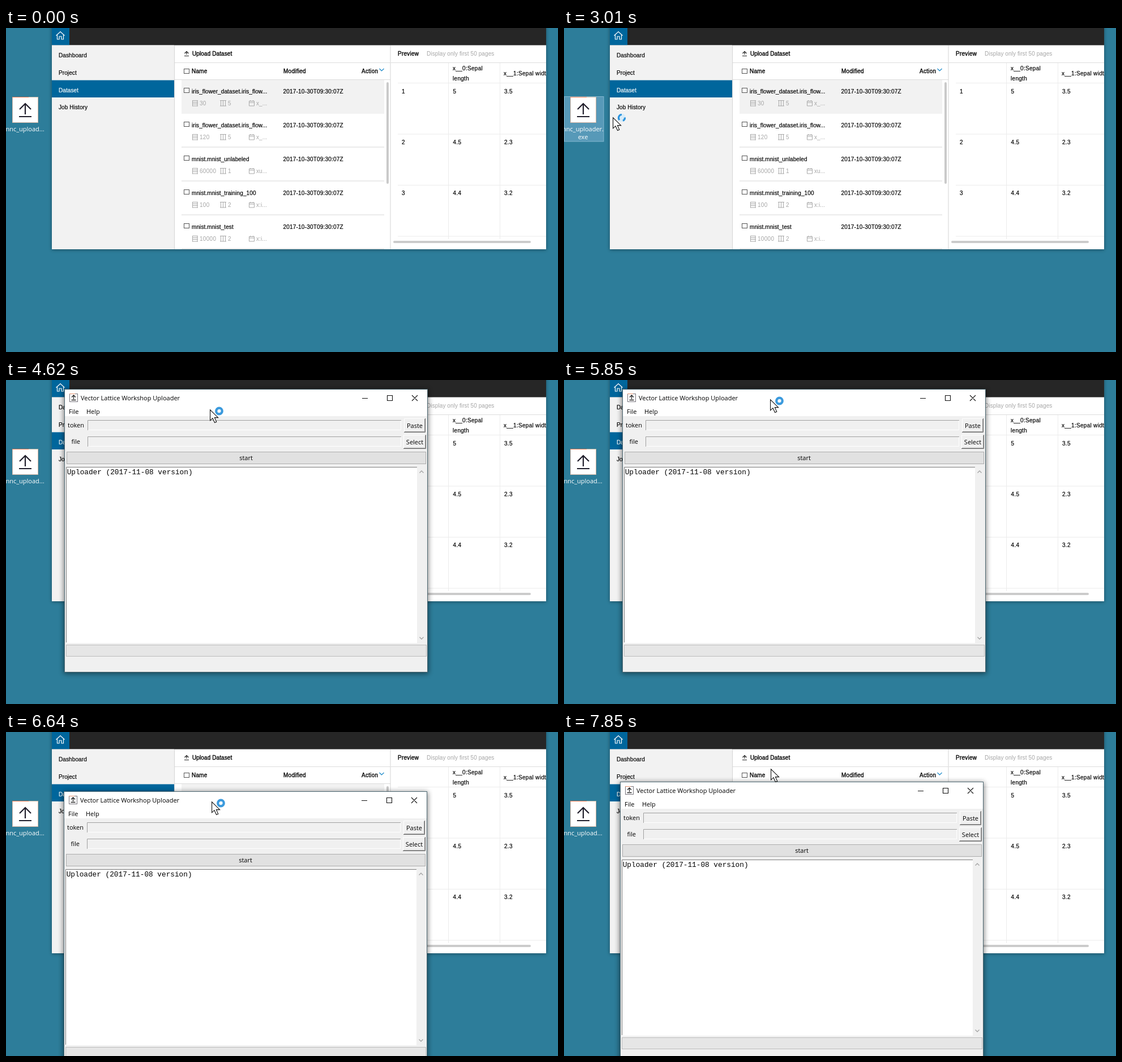
Write an HTML page that moves like this. It is 975 by 574 pixels and loops after 8 s.

```html
<!DOCTYPE html>
<html lang="en">
<head>
<meta charset="utf-8">
<title>Dataset uploader</title>
<style>
html, body { margin: 0; width: 100%; height: 100%; overflow: hidden; background: #2d7d9a; }
svg { display: block; width: 100vw; height: 100vh; }
text { white-space: pre; }
.web { font: 10px "Liberation Sans", Arial, sans-serif; letter-spacing: .1px; fill: #000; stroke: #000; stroke-width: .2px; }
.wide { letter-spacing: .3px; }
.head { letter-spacing: .25px; stroke-width: .35px; }
.pale { fill: #a6a6a6; stroke: none; }
.lit { fill: #fff; stroke: #fff; }
.ui { font: 11px "Open Sans", "Noto Sans", sans-serif; fill: #000; }
.mono { font: 12.75px "Liberation Mono", monospace; fill: #000; }
.mid { text-anchor: middle; }
.white { fill: #fff; }
</style>
</head>
<body>
<svg id="stage" viewBox="0 0 975 574" preserveAspectRatio="none">
<defs>
<filter id="soft" x="-10%" y="-10%" width="120%" height="120%"><feGaussianBlur stdDeviation="5"/></filter>
<filter id="faint" x="-10%" y="-10%" width="120%" height="120%"><feGaussianBlur stdDeviation="3"/></filter>
<clipPath id="page"><rect x="81" width="873" height="392"/></clipPath>
</defs>
</svg>
<script>
const LOOP = 8000;
const stage = document.getElementById('stage');

const rect = (x, y, w, h, fill, more = '') =>
  `<rect x="${x}" y="${y}" width="${w}" height="${h}" fill="${fill}" ${more}/>`;
const frame = (x, y, w, h, fill, stroke, more = '') =>
  rect(x + .5, y + .5, w - 1, h - 1, fill, `stroke="${stroke}" ${more}`);
const path = (d, stroke, width = 1, fill = 'none', more = '') =>
  `<path d="${d}" stroke="${stroke}" stroke-width="${width}" fill="${fill}" ${more}/>`;
const text = (x, y, str, cls, more = '') =>
  `<text x="${x}" y="${y}" class="${cls}" ${more}>${str}</text>`;
const group = (id, body) => `<g id="${id}">${body}</g>`;

function desktopIcon() {
  return group('glow', rect(.5, 121.5, 69.5, 79.5, '#4a91b9', 'id="glowBox" stroke="#74b3d8"')) +
    rect(11, 122, 46, 46, '#fff') +
    path('M11.5 122V168M56.5 122V168M11 167.5H57', '#d8b6a4') +
    path('M11 122.5H40', '#ee7a4e') + path('M40 122.5H57', '#c7b9a8') +
    path('M34 153V134M24 144L34 134L44 144M23 157H45', '#211f2c', 2.2) +
    text(33.5, 183, 'nnc_upload...', 'ui white mid', 'id="shortName"') +
    group('fullName', text(33.5, 183, 'nnc_uploader.', 'ui white mid') + text(33.5, 197, 'exe', 'ui white mid'));
}

function sidebar() {
  const items = ['Dashboard', 'Project', 'Dataset', 'Job History'];
  return rect(81, 30.5, 216, 361.5, '#f2f2f2') + rect(81, 92.5, 216, 30.5, '#00669c') +
    rect(81, 123, 216, 31, '#e2e2e2', 'id="hover"') +
    items.map((s, i) => text(93, 52 + i * 30.8, s, i === 2 ? 'web lit' : 'web')).join('');
}

function listRow([name, count, cols, field], i) {
  const y = i * 60;
  const icon = d => path(d, '#a8a8a8', 1, 'none', `transform="translate(0 ${y})"`);
  return (i ? rect(310, 150 + y, 358, 2, '#ebebeb') : rect(310, 92, 358, 60, '#f2f2f2')) +
    frame(314, 106 + y, 10, 9, '#fff', '#555') +
    text(328, 115.5 + y, name, 'web') +
    text(489.5, 115.5 + y, '2017-10-30T09:30:07Z', 'web', 'style="letter-spacing:.2px"') +
    icon('M329.5 128V138.5M338 128V138.5M329 128.5H339M329 131.5H339M329 134.5H339M329 138H339') +
    icon('M378 128.5H389M378 138H389M379.5 128V138M383.5 128V138M387.5 128V138') +
    icon('M429.5 129.5H438.5V138H429.5ZM429.5 132H438.5M431.5 128V130M436.5 128V130') +
    text(342, 137 + y, count, 'web pale wide') + text(392, 137 + y, cols, 'web pale') +
    text(442, 137 + y, field, 'web pale');
}

function datasetList() {
  const rows = [
    ['iris_flower_dataset.iris_flow...', 30, 5, 'x_...'],
    ['iris_flower_dataset.iris_flow...', 120, 5, 'x_...'],
    ['mnist.mnist_unlabeled', 60000, 1, 'xu...'],
    ['mnist.mnist_training_100', 100, 2, 'x:i...'],
    ['mnist.mnist_test', 10000, 2, 'x:i...']
  ];
  return path('M319 47V42M315.5 45L319 41.5L322.5 45M315 49.5H323', '#222', 1.2) +
    text(329, 49.3, 'Upload Dataset', 'web', 'style="stroke-width:.35px"') +
    rect(329, 50, 70, 1, '#000', 'id="underline"') +
    frame(314, 72, 10, 9, '#fff', '#555') +
    text(328, 80, 'Name', 'web head') + text(490, 80, 'Modified', 'web head') + text(628, 80, 'Action', 'web head') +
    path('M659.5 72L663.5 76L667.5 72', '#1787c8', 1.2) +
    rows.map(listRow).join('') +
    path('M298 61.5H679M298 91.5H679', '#dcdcdc') +
    rect(672, 96, 4, 180, '#cacaca', 'rx="2"') + path('M297.5 31V392M679 31V392', '#d4d4d4');
}

function preview() {
  const cells = [[1, '5', '3.5'], [2, '4.5', '2.3'], [3, '4.4', '3.2']];
  return text(692, 49, 'Preview', 'web head') + text(743, 49, 'Display only first 50 pages', 'web pale') +
    path('M680 61.5H954', '#dcdcdc') +
    path('M692 97.5H954M692 188H954M692 278.5H954M692 369H954M781.5 62V374M872.5 62V374', '#ececec') +
    text(789, 75, 'x__0:Sepal', 'web wide') + text(789, 92.5, 'length', 'web wide') +
    text(879, 84, 'x__1:Sepal width', 'web wide') +
    cells.map((row, i) => row.map((s, j) => text(699 + j * 90.5, 115.5 + i * 90.4, s, 'web wide')).join('')).join('') +
    rect(684, 377, 243, 4, '#cbcbcb', 'rx="2"');
}

function browser() {
  return rect(81, -8, 873, 401, '#000', 'opacity=".38" filter="url(#faint)"') +
    '<g clip-path="url(#page)">' + rect(81, 0, 873, 392, '#fff') + rect(81, 0, 873, 30.5, '#262626') +
    rect(81, 0, 31, 30.5, '#00669c') +
    path('M88.5 13.5L96 6.5L103.5 13.5M90.5 12.5V20H94V15H98V20H101.5V12.5', '#fff', 1.2) +
    sidebar() + datasetList() + preview() + '</g>';
}

function field(y) {
  return rect(40, y, 554, 18, '#f0f0f0') + path(`M40.5 ${y + 18}V${y + .5}H594`, '#a0a0a0') +
    path(`M41 ${y + 17.5}H593.5V${y + 1}`, '#fff');
}

function raised(x, y, w, h, label) {
  return rect(x, y, w, h, '#f0f0f0') + path(`M${x + .5} ${y + h}V${y + .5}H${x + w}`, '#fff') +
    path(`M${x + 1} ${y + h - 1.5}H${x + w - 1.5}V${y + 1}`, '#a0a0a0') +
    path(`M${x} ${y + h - .5}H${x + w - .5}V${y}`, '#696969') +
    text(x + w / 2, y + h / 2 + 4, label, 'ui mid');
}

function uploader() {
  return rect(-2, 0, 644, 503, '#000', 'opacity=".5" filter="url(#soft)"') +
    frame(-1, -1, 642, 502, '#f0f0f0', '#4f6973') + rect(0, 0, 640, 47, '#fff') +
    frame(8, 7, 15, 15, '#fff', '#77747c') + path('M8 7.5H18', '#e5936f') +
    path('M15.5 17V10.5M12 13.5L15.5 10L19 13.5M11.5 18.5H19.5', '#222', 1.3) +
    text(28, 19, 'Vector Lattice Workshop Uploader', 'ui') +
    path('M525 15.5H535M569.5 10.5H578.5V19.5H569.5ZM613 10L623 20M623 10L613 20', '#111', 1.1) +
    text(7, 43.3, 'File', 'ui') + text(38, 43.3, 'Help', 'ui') +
    text(5, 67, 'token', 'ui') + text(11.5, 96, 'file', 'ui') +
    field(54) + field(83) + raised(599, 51, 38, 25, 'Paste') + raised(598, 80, 40, 25, 'Select') +
    frame(3, 110, 635, 22, '#e1e1e1', '#adadad') + text(320, 125, 'start', 'ui mid') +
    rect(2, 137, 620, 312, '#fff') + path('M2.5 448V137.5H622', '#7b7b7b') +
    path('M626.5 147.5L630 144L633.5 147.5M626.5 438.5L630 442L633.5 438.5', '#a3a3a3', 1.3) +
    text(3.7, 150, 'Uploader (2017-11-08 version)', 'mono') +
    frame(2, 452, 637, 21, '#e6e6e6', '#bcbcbc');
}

// Every pointer has its top-left or tip at 0,0.
function pointers() {
  const arrow = path('M.6 .8V19.8L5 15.7L8.6 23.6L11.8 22.2L8.4 14.6H14.6Z', '#111', 1.1, '#fff');
  const hand = path('M5.5 18V2.5Q5.5 .6 7.3 .6T9.2 2.5V9.5Q12.3 8.3 12.8 10.7Q15.4 9.7 15.8 12Q18.5 11.4 18.5 14V19.5Q18.5 22 16.8 24V27.5H7V25L1.2 17.5Q-.2 15 1.7 14.2Q3.5 13.7 5.5 18Z', '#111', 1.1, '#fff') +
    path('M9.2 9.5V14M12.8 11V15M15.8 12.5V16', '#111');
  const resize = path('M.8 5L5.5 .7V3.8H17.5V.7L22.2 5L17.5 9.3V6.2H5.5V9.3Z', '#111', 1, '#fff');
  const ring = '<circle cx="16.5" cy="3" r="5.3" fill="#f4f8fb" stroke="#3b9add" stroke-width="4.2"/>';
  const pale = '<circle cx="16" cy="1" r="7.2" fill="#d9ecf8"/>' +
    path('M16 -4.5A5.5 5.5 0 0 0 12 4.8M18 6.2A5.5 5.5 0 0 0 21.4 .5', '#2c94de', 3.2);
  return group('arrow', arrow) + group('hand', hand) + group('resize', resize) + group('ring', ring) + group('pale', pale);
}

stage.insertAdjacentHTML('beforeend',
  browser() + desktopIcon() + group('win', uploader()) + group('cursor', pointers()));

const el = Object.fromEntries([...stage.querySelectorAll('[id]')].map(n => [n.id, n]));
const show = (id, on) => el[id].setAttribute('display', on ? 'inline' : 'none');
const move = (id, x, y) => el[id].setAttribute('transform', `translate(${x} ${y})`);
const at = (track, t) => track.findLast(step => step[0] <= t);

// time, x, y, visible shapes
const cursorTrack = [
  [0, 0, 0, ''], [590, 582, 463, 'arrow'], [770, 284, 262, 'resize'], [990, 68, 165, 'arrow'],
  [1380, 40, 157, 'arrow'], [1800, 40, 157, 'arrow pale'], [3010, 86, 158, 'arrow pale'],
  [3230, 280, 135, 'hand'], [3400, 352, 63, 'hand'], [3610, 356, 52, 'hand'],
  [4620, 360, 52, 'arrow ring'], [5430, 364, 43, 'arrow ring'], [5640, 364, 37, 'arrow ring'],
  [5850, 364, 34, 'arrow ring'], [7250, 360, 106, 'arrow'], [7850, 365, 65, 'arrow']
];
const winTrack = [
  [4620, 104, 17], [6030, 104, 64], [6250, 104, 108], [6460, 102, 112], [6640, 103, 106],
  [6860, 103, 91], [7070, 100, 88], [7670, 100, 89]
];
const shapes = ['arrow', 'hand', 'resize', 'ring', 'pale'];

function update(t) {
  const within = (a, b) => t >= a && t < b;
  const win = at(winTrack, t);
  let [, x, y, kind] = at(cursorTrack, t);

  show('win', win);
  if (win) move('win', win[1], win[2]);
  // The pointer holds the title bar while dragging.
  if (within(6030, 7250)) [x, y] = [win[1] + 260, win[2] + 17];
  move('cursor', x, y);
  const visible = kind.split(' ');
  shapes.forEach(s => show(s, visible.includes(s)));

  const open = within(1800, 4620);
  const left = t >= 3010;
  show('glow', within(990, 4620));
  el.glowBox.setAttribute('height', open ? 79.5 : 66.5);
  el.glowBox.setAttribute('fill', left ? '#5799b8' : '#4a91b9');
  el.glowBox.setAttribute('stroke', left ? '#84b8d0' : '#74b3d8');
  show('shortName', !open);
  show('fullName', open);
  show('hover', within(3230, 3400));
  show('underline', within(3610, 4620));
}

const start = performance.now();
function tick() {
  update((performance.now() - start) % LOOP);
  requestAnimationFrame(tick);
}
tick();
</script>
</body>
</html>
```
